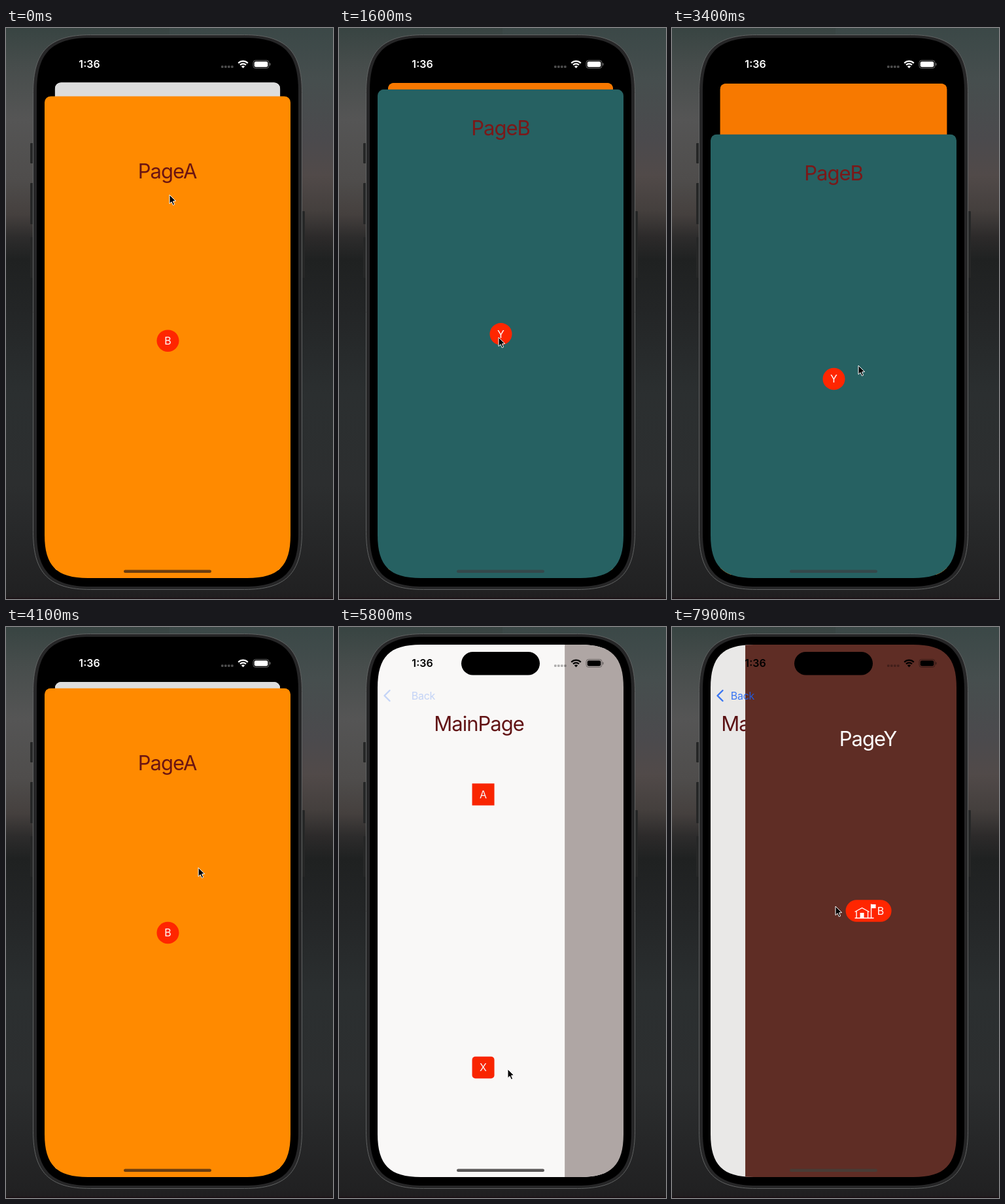
These frames come from a looping animation (500 by 873 pixels, 8000 ms). An HTML page with a canvas:

```html
<!DOCTYPE html>
<html lang="en">
<head>
<meta charset="utf-8">
<title>Page transitions</title>
<style>
  html, body { margin: 0; width: 100%; height: 100%; overflow: hidden; background: #222; }
  canvas { display: block; width: 500px; height: 873px; }
</style>
</head>
<body>
<canvas id="stage" width="500" height="873"></canvas>
<script>
const ctx = document.getElementById('stage').getContext('2d');
const LOOP = 8000;
const SCREEN = { x: 59, y: 27, w: 376, h: 814 };
const BOTTOM = SCREEN.y + SCREEN.h;
const SHEET_TOP = 93.5;
const RED = '#ff2600';
const BLUE = '#1b62f5';

const clamp = v => Math.max(0, Math.min(1, v));
const lerp = (a, b, p) => a + (b - a) * p;

// Critically damped spring, time in ms
function spring(ms) {
  if (ms <= 0) return 0;
  const x = ms * 0.01826;
  return 1 - (1 + x) * Math.exp(-x);
}

function fillRect(x, y, w, h, color, r = 0) {
  ctx.fillStyle = color;
  ctx.beginPath();
  ctx.roundRect(x, y, w, h, r);
  ctx.fill();
}

// Rounded box with continuous corners; e is how far a corner reaches
function squircle(x, y, w, h, e) {
  const c = e * 0.28, r = x + w, b = y + h;
  ctx.beginPath();
  ctx.moveTo(x + e, y);
  ctx.lineTo(r - e, y);
  ctx.bezierCurveTo(r - c, y, r, y + c, r, y + e);
  ctx.lineTo(r, b - e);
  ctx.bezierCurveTo(r, b - c, r - c, b, r - e, b);
  ctx.lineTo(x + e, b);
  ctx.bezierCurveTo(x + c, b, x, b - c, x, b - e);
  ctx.lineTo(x, y + e);
  ctx.bezierCurveTo(x, y + c, x + c, y, x + e, y);
  ctx.closePath();
}

function text(str, x, y, size, color, { align = 'center', weight = 400, spacing = 0 } = {}) {
  ctx.font = `${weight} ${size}px Inter, sans-serif`;
  ctx.letterSpacing = spacing + 'px';
  ctx.textAlign = align;
  ctx.textBaseline = 'alphabetic';
  ctx.fillStyle = color;
  ctx.fillText(str, x, y);
}

const title = (str, x, y, color) => text(str, x, y, 31, color, { spacing: -1 });

function button(label, y, radius, w = 34) {
  fillRect(188.5 - w / 2, y - 16.75, w, 33.5, RED, radius);
  text(label, w > 34 ? 207 : 188.5, y + 5.7, 16, '#fff');
}

function houseIcon(x, y) {
  ctx.save();
  ctx.translate(x, y);
  ctx.strokeStyle = ctx.fillStyle = '#fff';
  ctx.lineWidth = 1.4;
  ctx.beginPath();
  ctx.moveTo(0, 12); ctx.lineTo(11, 6); ctx.lineTo(22, 12);
  ctx.moveTo(2.5, 11); ctx.lineTo(2.5, 21.5);
  ctx.moveTo(20, 11); ctx.lineTo(20, 21.5);
  ctx.moveTo(0, 21.5); ctx.lineTo(29, 21.5);
  ctx.moveTo(25, 0); ctx.lineTo(25, 21.5);
  ctx.stroke();
  ctx.fillRect(8, 13.5, 6, 8);
  ctx.fillRect(25, 0.5, 7, 6);
  ctx.restore();
}

function pageYContent(titleY, buttonY) {
  title('PageY', 187.5, titleY, '#fff');
  button('B', buttonY, 16.75, 70);
  houseIcon(167.5, buttonY - 10.5);
}

const pages = {
  main: {
    bg: '#fffefd', dim: '#dddddd', bar: '#5a5858',
    draw() {
      title('MainPage', 182, 131.5, '#641416');
      button('A', 229, 0);
      button('X', 646.5, 5);
    }
  },
  a: {
    bg: '#ff8a00', dim: '#f77800', bar: '#6b3d10',
    draw() {
      title('PageA', 187.5, 126, '#6b1512');
      button('B', 374, 17);
    }
  },
  b: {
    bg: '#266162', dim: '#1f5455', bar: '#34484b',
    draw() {
      title('PageB', 188, 70.5, '#7b1818');
      button('Y', 374, 17);
    }
  },
  x: {
    bg: '#afa6a4', bar: '#494a4d',
    draw() {
      title('PageX', 187.5, 212.5, '#fff');
      button('Y', 407, 17);
    }
  },
  y: {
    bg: '#5f2d25', dim: '#52261f', bar: '#483b35',
    draw() { pageYContent(155, 407); }
  },
  ySheet: {
    bg: '#5f2d25', dim: '#52261f', bar: '#483b35',
    draw() { pageYContent(56, 374); }
  }
};

const pointerPath = [
  [0, 250, 255], [150, 250, 258], [750, 246, 470], [1050, 244, 473],
  [1850, 244, 473], [2350, 290, 250], [2450, 290, 250], [2720, 288, 400],
  [2950, 285, 447], [3200, 285, 447], [3400, 285, 516], [3500, 285, 540],
  [3700, 290, 540], [4250, 295, 330], [4400, 295, 333], [4600, 295, 470],
  [4750, 295, 470], [5500, 258, 676], [5850, 258, 676], [6600, 252, 429],
  [7050, 252, 429], [7400, 250, 427], [LOOP, 250, 427]
];

function pointerAt(t) {
  const i = pointerPath.findIndex(k => k[0] > t);
  const [t0, x0, y0] = pointerPath[i - 1], [t1, x1, y1] = pointerPath[i];
  const u = (t - t0) / (t1 - t0), p = u * u * (3 - 2 * u);
  return [lerp(x0, x1, p), lerp(y0, y1, p)];
}

const sheets = [
  { page: pages.a, show: -340, grab: 4400, release: 4599 },
  { page: pages.b, show: 1050, grab: 3200, release: 3470 },
  { page: pages.ySheet, show: 1780, grab: 2450, release: 2700 }
];

function sheetTop({ show, grab, release }, t) {
  if (t < grab) return lerp(BOTTOM, SHEET_TOP, spring(t - show));
  const dragged = SHEET_TOP + pointerAt(Math.min(t, release))[1] - pointerAt(grab)[1];
  return lerp(dragged, BOTTOM, spring(t - release));
}

// depth counts how many sheets lie above this page
function drawCard(page, top, depth, radius) {
  const scale = 1 - 0.085 * depth;
  const y = lerp(top, 84, Math.min(depth, 1)) + 9 * Math.max(0, depth - 1);
  ctx.save();
  ctx.translate(SCREEN.x + SCREEN.w * (1 - scale) / 2, y);
  ctx.scale(scale, scale);
  ctx.beginPath();
  ctx.roundRect(0, 0, SCREEN.w, SCREEN.h, [radius, radius, 0, 0]);
  ctx.clip();
  fillRect(0, 0, SCREEN.w, SCREEN.h, page.bg);
  ctx.globalAlpha = clamp(depth);
  fillRect(0, 0, SCREEN.w, SCREEN.h, page.dim);
  ctx.globalAlpha = 1;
  page.draw();
  ctx.restore();
}

function drawSheets(t) {
  const tops = sheets.map(s => sheetTop(s, t));
  const shown = tops.map(y => clamp((BOTTOM - y) / (BOTTOM - SHEET_TOP)));
  const depthAbove = i => shown.slice(i + 1).reduce((sum, p) => sum + p, 0);
  const depth = depthAbove(-1);
  drawCard(pages.main, SCREEN.y, depth, lerp(52, 10, clamp(depth)));
  let front = pages.main;
  sheets.forEach((s, i) => {
    if (shown[i] < 0.002) return;
    drawCard(s.page, tops[i], depthAbove(i), 9.6);
    front = s.page;
  });
  return front;
}

function drawFull(page, offset, shade) {
  ctx.save();
  ctx.translate(SCREEN.x + offset, SCREEN.y);
  fillRect(0, 0, SCREEN.w, SCREEN.h, page.bg);
  page.draw();
  if (shade > 0) fillRect(0, 0, SCREEN.w, SCREEN.h, `rgba(0,0,0,${shade})`);
  ctx.restore();
}

function backLabel(dx, alpha) {
  ctx.globalAlpha = clamp(alpha);
  text('Back', 85 + dx, 110.5, 16, BLUE, { align: 'left', spacing: -0.3 });
  ctx.globalAlpha = 1;
}

function chevron(alpha) {
  ctx.globalAlpha = clamp(alpha);
  ctx.strokeStyle = BLUE;
  ctx.lineWidth = 2.4;
  ctx.lineCap = ctx.lineJoin = 'round';
  ctx.beginPath();
  ctx.moveTo(77.5, 97); ctx.lineTo(69.5, 105); ctx.lineTo(77.5, 113);
  ctx.stroke();
  ctx.globalAlpha = 1;
  ctx.lineCap = 'butt';
  ctx.lineJoin = 'miter';
}

const PUSH_X = 5750, PUSH_Y = 6982, POP = 7865;

function drawNavigation(t) {
  let under = pages.main, over = pages.x, p = spring(t - PUSH_X);
  if (t > PUSH_Y) { under = pages.x; over = pages.y; p = spring(t - PUSH_Y); }
  if (t > POP) { under = pages.main; p = 1 - spring(t - POP); }
  drawFull(under, -0.3 * SCREEN.w * p, 0.1 * p);
  drawFull(over, SCREEN.w * (1 - p), 0);

  const betweenPages = under === pages.x;
  if (betweenPages) backLabel(-34 * p, 1 - p);
  backLabel(34 * (1 - p), p);
  chevron(betweenPages ? 1 : p);
  return p > 0.5 || betweenPages && p > 0.3 ? over : under;
}

function statusBar(color) {
  text('1:36', 127.5, 61, 16, color, { weight: 600 });
  ctx.globalAlpha = 0.3;
  for (let i = 0; i < 4; i++) fillRect(329 + i * 5, 57.5, 3.6, 3.6, color, 1);
  ctx.globalAlpha = 1;

  ctx.strokeStyle = color;
  ctx.lineWidth = 2.3;
  for (const r of [10.3, 6.4]) {
    ctx.beginPath();
    ctx.arc(362.5, 61, r, -Math.PI * 0.75, -Math.PI * 0.25);
    ctx.stroke();
  }
  ctx.fillStyle = color;
  ctx.beginPath();
  ctx.moveTo(362.5, 61.5);
  ctx.arc(362.5, 61.5, 3.8, -Math.PI * 0.75, -Math.PI * 0.25);
  ctx.fill();

  ctx.globalAlpha = 0.4;
  ctx.lineWidth = 1;
  ctx.beginPath();
  ctx.roundRect(378, 49.5, 24, 12, 3.6);
  ctx.stroke();
  fillRect(403, 53.5, 1.4, 4, color, 1);
  ctx.globalAlpha = 1;
  fillRect(379.7, 51.2, 20.6, 8.6, color, 2.4);
}

function verticalGradient(stops) {
  const g = ctx.createLinearGradient(0, 0, 0, 873);
  for (const [y, color] of stops) g.addColorStop(y / 873, color);
  return g;
}

const lower = [[355, '#1f2121'], [430, '#232526'], [560, '#2b2f30'], [700, '#2c2e2f'], [860, '#212122'], [873, '#201d1f']];
const leftTone = verticalGradient([[0, '#384442'], [60, '#474d4c'], [140, '#555555'], [230, '#4f4d4c'], [285, '#45403e'], [320, '#2d2c2c'], ...lower]);
const rightTone = verticalGradient([[0, '#3b4847'], [80, '#464e4e'], [170, '#4b4a4d'], [225, '#514a49'], [280, '#443f3d'], [320, '#2c2a2a'], ...lower]);

function backdrop() {
  fillRect(0, 0, 250, 873, leftTone);
  fillRect(250, 0, 250, 873, rightTone);
  fillRect(0, 871.5, 500, 1.5, '#190e12');
}

function phoneBody() {
  for (const [y, h] of [[176, 31], [237, 63], [320, 62]]) fillRect(37, y, 5, h, '#262727', 1);
  fillRect(452, 280, 5, 102, '#262727', 1);
  squircle(41.5, 10.5, 411, 848, 88);
  ctx.fillStyle = '#262627';
  ctx.fill();
  ctx.strokeStyle = '#616363';
  ctx.lineWidth = 1;
  ctx.stroke();
  squircle(47, 15, 400, 839, 82);
  ctx.fillStyle = '#000';
  ctx.fill();
}

function drawPointer(x, y) {
  ctx.save();
  ctx.translate(x, y);
  ctx.beginPath();
  ctx.moveTo(0, 0);
  ctx.lineTo(0, 13.6);
  ctx.lineTo(3.1, 10.8);
  ctx.lineTo(5.3, 15.8);
  ctx.lineTo(7.6, 14.8);
  ctx.lineTo(5.5, 9.9);
  ctx.lineTo(9.6, 9.6);
  ctx.closePath();
  ctx.fillStyle = '#000';
  ctx.strokeStyle = '#fff';
  ctx.lineWidth = 1;
  ctx.fill();
  ctx.stroke();
  ctx.restore();
}

function render(t) {
  backdrop();
  phoneBody();

  ctx.save();
  squircle(SCREEN.x, SCREEN.y, SCREEN.w, SCREEN.h, 66);
  ctx.clip();
  const front = t < PUSH_X ? drawSheets(t) : drawNavigation(t);
  fillRect(187, 38, 120, 35.5, '#000', 17.75);
  statusBar(t < 4950 ? '#fff' : '#000');
  fillRect(180, 828.5, 134, 4.6, front.bar, 2.3);
  ctx.restore();

  drawPointer(...pointerAt(t));
}

function frame(now) {
  render(now % LOOP);
  requestAnimationFrame(frame);
}
render(0);
requestAnimationFrame(frame);
</script>
</body>
</html>
```
